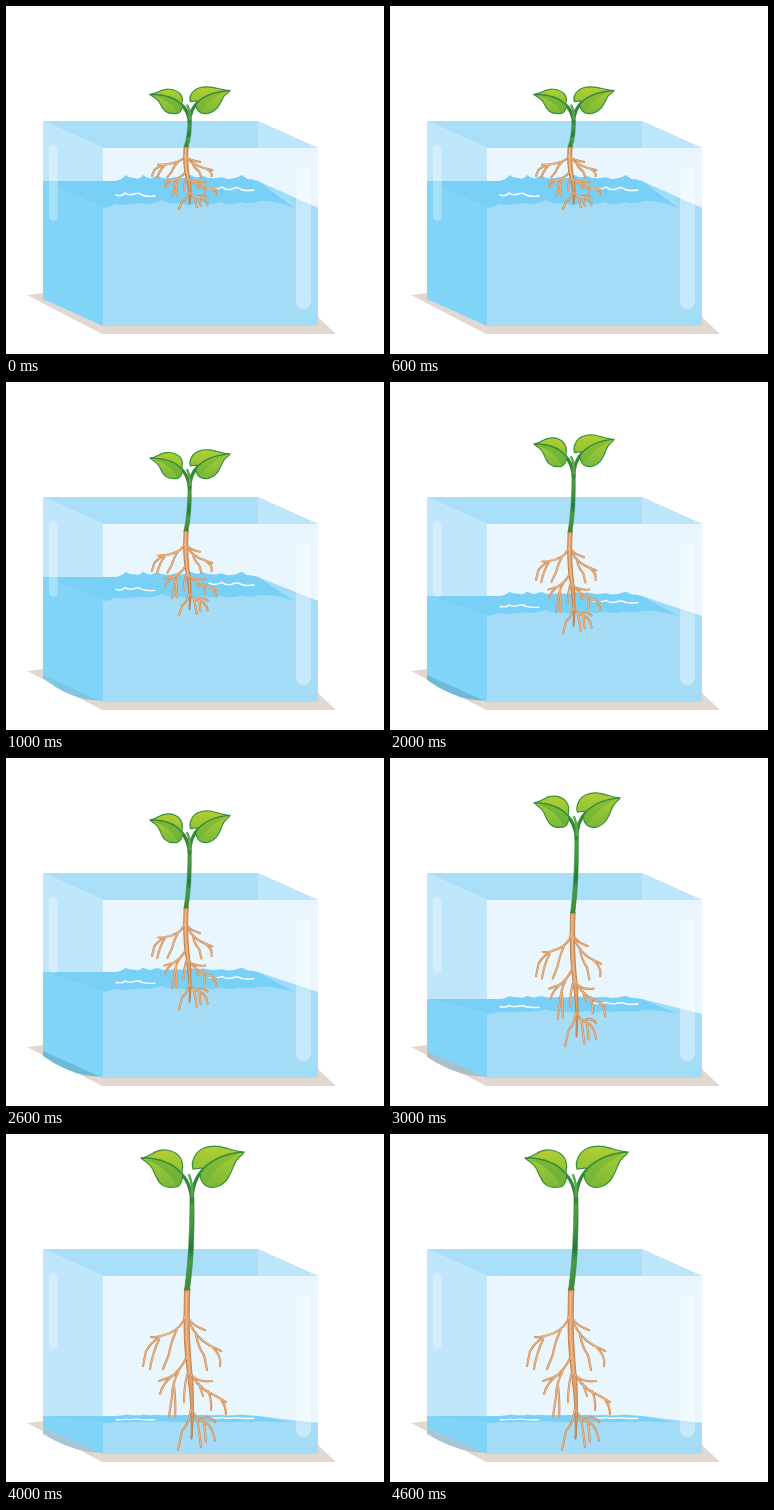
Recreate the animation shown at these times as an HTML page. Size 378x348 px, loop 5000 ms.

```html
<!DOCTYPE html>
<html>
<head>
<meta charset="utf-8">
<style>
html, body { margin: 0; width: 100%; height: 100%; overflow: hidden; background: #fff }
svg { display: block; width: 378px; height: 348px }
.line { fill: none; stroke-linecap: round; stroke-linejoin: round }
.line, .leaf { vector-effect: non-scaling-stroke }
</style>
</head>
<body>
<svg viewBox="0 0 378 348">
  <defs>
    <linearGradient id="stemFill" x1="0" y1="0" x2="0" y2="1">
      <stop offset="0" stop-color="#55a344"/>
      <stop offset=".35" stop-color="#3f943f"/>
      <stop offset=".55" stop-color="#1f7a3b"/>
      <stop offset=".7" stop-color="#4b9c42"/>
      <stop offset="1" stop-color="#3c8a3a"/>
    </linearGradient>
    <linearGradient id="leafFill" x1="0" y1="0" x2="0" y2="1">
      <stop offset="0" stop-color="#b1cf31"/>
      <stop offset="1" stop-color="#79b93a"/>
    </linearGradient>
  </defs>

  <!-- Tank -->
  <path fill="#e3d8cf" d="M21 289 37 287 97 300 312 311 330 328H96Z"/>
  <path fill="#a9dff9" d="M37 115H252L312 142H97Z"/>
  <path fill="#bde6fb" d="M252 115 312 142H252Z"/>
  <path fill="#bfe6fb" d="M37 115 97 142V320L37 293Z"/>
  <path fill="#e9f6fe" d="M97 142H312V320H97Z"/>

  <!-- Water -->
  <path id="spill"/>
  <path id="side" fill="#80d4f7"/>
  <path id="front" fill="#a5ddf9"/>
  <g id="surface">
    <path fill="#a0dbf8" d="M97 0H252L312 27H97Z"/>
    <path fill="#79d0f6" d="M37 0H109Q116-1 120-6 122-3 129-3 134-1 137-6 141-2 146-3 151-7 156-3 163-2 170-4 178-1 185-6 190-2 197-5 204-2 211-3 216-5 221-2 229-2 236-6 241-1 245-2L252 0 288 27Q270 19 254 20 244 24 235 21 225 25 214 21 205 25 196 21 185 26 174 22 164 24 155 19 145 25 134 22 120 25 109 23 103 27 97 27Z"/>
    <path class="line" stroke="#fff" stroke-width="1.4" d="M110 14Q116 16 119 12 123 15 128 13 133 11 136 14 142 16 149 15M203 7Q209 10 216 6 220 10 226 8 232 5 236 9 242 10 248 9"/>
  </g>

  <rect x="43" y="139" width="8.500" height="76" rx="4.200" fill="#fff" opacity=".33"/>
  <rect x="290" y="160" width="15" height="143" rx="7.500" fill="#fff" opacity=".37"/>

  <!-- Plant -->
  <g id="roots"></g>
  <path id="stem" fill="url(#stemFill)" stroke="#2f8039" stroke-width=".6"/>
  <g id="leaves">
    <path class="line" stroke="#35883a" stroke-width="3.400" d="M186 68C185 54 181 44 173 38M186 68C186 55 189 43 198 35"/>
    <path class="line" stroke="#5ba846" stroke-width="2.400" d="M186 62Q187 50 183 41"/>
    <g stroke="#38903f" stroke-width="1.200">
      <path class="leaf" fill="url(#leafFill)" d="M135 24C146 23 147 15 160 16 172 17 179 26 176 37 178 44 175 52 170 53 153 56 151 44 147 36 144 29 139 28 135 24Z"/>
      <path class="leaf" fill="url(#leafFill)" d="M238 18C226 18 213 8 198 14 188 18 185 29 187 35L196 34C191 47 199 55 210 53 224 49 225 36 230 27 234 21 237 21 238 18Z"/>
    </g>
    <path fill="#64ae38" d="M140 26C153 25 167 27 175 38 177 44 175 51 170 52 167 42 155 31 140 26Z" opacity=".65"/>
    <path fill="#5faa38" d="M196 34Q209 22 234 19C220 27 207 36 199 50 194 46 194 40 196 34Z" opacity=".4"/>
    <path class="line" stroke="#35883a" stroke-width="1.400" d="M137 24C154 24 168 30 175 39M236 18C219 20 204 25 195 38"/>
  </g>
</svg>
<script>
const $ = id => document.getElementById(id);
const set = (id, attrs) => {
  for (const k in attrs) $(id).setAttribute(k, attrs[k]);
};

const branches =
  'M180 180Q176 194 164 199T145 203M164 199Q148 203 140 217L137 232M153 206Q147 217 144 235' +
  'M171 195Q164 211 163 220L157 235M182 184Q187 192 199 196M183 188Q191 205 203 211L215 217' +
  'M205 212Q216 221 214 232M190 201Q192 213 198 221L201 236M181 222Q174 238 164 243L153 247' +
  'M169 240Q157 248 154 260M173 236Q166 250 166 262L163 283M168 252Q170 268 169 282' +
  'M182 238Q178 251 178 268M185 241Q193 249 206 247M187 244Q197 257 208 261T220 280' +
  'M208 261L220 268M202 257Q206 266 205 276M193 250L197 262M185 275Q183 290 176 297L172 316' +
  'M186 276Q189 284 198 288T209 307M191 283Q193 296 195 313M198 288L200 308M194 286Q202 280 209 288';
const main = 'M178.500 155H184C182 190 184 220 187 250 188 275 187 292 186 305H185C186 280 184 260 181 235 177 205 178 180 178.500 155Z';
$('roots').innerHTML =
  `<path class="line" stroke="#ce8a50" stroke-width="2.200" d="${branches}"/>
   <path class="leaf" fill="#dfa06a" stroke="#bd7136" stroke-width=".8" d="${main}"/>
   <path class="line" stroke="#f2c8a2" stroke-width=".8" d="${branches}M180.500 158Q179 205 184 240"/>`;

// back and front water level, side bottom, spill colour,
// leaves [x, y, sx, sy], roots [x, y, sx, sy]
const stages = [
  [175, 202, 292, 'none', [144, 80, .777, .65], [180, 140, .774, .389]],
  [195, 219, 296, '#80c6e2', [144, 67, .777, .7], [180, 148, .774, .531]],
  [214, 234, 298, '#6fb9d6', [144, 52, .777, .77], [180, 149, .774, .636]],
  [241, 256, 299, '#a9bfc9', [144, 34, .835, .835], [182.7, 154, .833, .833]],
  [282, 289, 300, '#a9c6d5', [135, 11, 1, 1], [181, 155, 1, 1]]
];

const place = ([x, y, sx, sy], ox, oy) =>
  `translate(${x} ${y}) scale(${sx} ${sy}) translate(${-ox} ${-oy})`;

function show([back, front, low, spill, leaf, root]) {
  set('side', { d: `M37 ${back}L97 ${front}V320L37 293Z` });
  set('front', { d: `M97 ${front}H312V320H97Z` });
  set('spill', { d: `M37 292 97 319 80 317.500Q58 313 37 ${low}Z`, fill: spill });
  set('surface', { transform: `translate(0 ${back}) scale(1 ${(front - back) / 27})` });
  set('leaves', { transform: place(leaf, 135, 11) });
  set('roots', { transform: place(root, 181, 155) });

  const topX = leaf[0] + 51 * leaf[2], topY = leaf[1] + 52 * leaf[3];
  const [x, y, w] = root, mid = topY + (y - topY) * .6;
  set('stem', {
    d: `M${topX - 2 * w} ${topY}Q${topX - 2 * w} ${mid} ${x - 2.5 * w} ${y + 1}` +
       `H${x + 2.5 * w}Q${topX + 3 * w} ${mid} ${topX + 2 * w} ${topY}Z`
  });
}

const start = performance.now();
function tick() {
  show(stages[Math.floor((performance.now() - start) / 1000) % 5]);
  requestAnimationFrame(tick);
}
tick();
</script>
</body>
</html>
```
